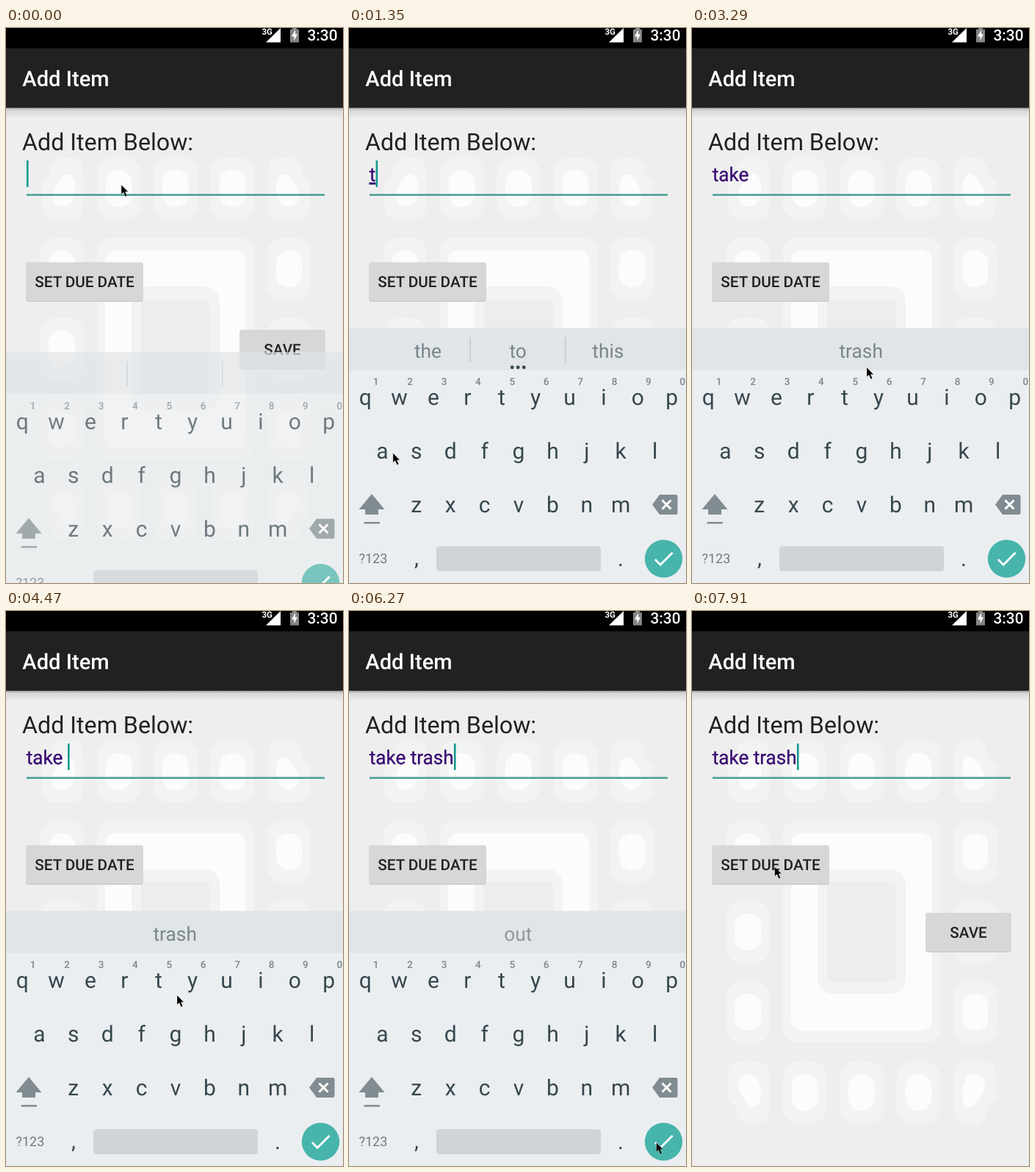
An HTML page that plays this animation: 459 px wide and 754 px high, repeating every 8000 ms.

```html
<!DOCTYPE html>
<html lang="en">
<head>
<meta charset="utf-8">
<title>Add Item</title>
<style>
  html, body { margin: 0; width: 100%; height: 100%; overflow: hidden; background: #eee; }
  svg { display: block; width: 459px; height: 754px; }
  text { font-family: Roboto, "Noto Sans", sans-serif; text-rendering: geometricPrecision; white-space: pre; }
  .mid { text-anchor: middle; }
  .medium { font-weight: 500; }
  .key { font-size: 30px; fill: #37474f; }
  .hint { font-size: 13.5px; font-weight: 500; fill: #7b868b; }
  .word { font-size: 26.3px; fill: #78868c; }
  .cap { font-size: 20.7px; fill: #202020; }
  #field { font-size: 26.1px; fill: #380a70; stroke: #380a70; stroke-width: .3px; }
</style>
</head>
<body>
<svg id="stage" viewBox="0 0 459 754" xmlns="http://www.w3.org/2000/svg">
  <defs>
    <linearGradient id="shade" x1="0" y1="0" x2="0" y2="1">
      <stop offset="0" stop-color="#000" stop-opacity=".28"/>
      <stop offset=".3" stop-color="#000" stop-opacity=".09"/>
      <stop offset="1" stop-color="#000" stop-opacity="0"/>
    </linearGradient>
  </defs>
  <rect width="459" height="754" fill="#eee"/>
  <g id="pattern"></g>

  <rect y="108" width="459" height="15" fill="url(#shade)"/>
  <rect y="27" width="459" height="81.5" fill="#212121"/>
  <rect width="459" height="27.5" fill="#000"/>
  <text x="348.5" y="8.5" font-size="11.5" font-weight="700" fill="#fff">3G</text>
  <path d="M354 19.5H374V0Z" fill="#fff"/>
  <path d="M387 2H390V0H396V2H399V19.5H387Z" fill="#858585"/>
  <path d="M394 2.5L389 11.5H392.5V17L397 8.5H394Z" fill="#fff"/>
  <text x="410.5" y="17" class="medium" font-size="20.8" fill="#fff">3:30</text>
  <text x="22.3" y="78.5" class="medium" font-size="29.1" fill="#fff">Add Item</text>

  <text x="22" y="165.5" font-size="32.2" fill="#212121">Add Item Below:</text>
  <rect x="28" y="225.5" width="406" height="2.5" fill="#469f96"/>
  <text id="field" x="27.7" y="208"></text>
  <rect id="caret" y="180" width="2.6" height="36" fill="#109a8d"/>
  <g id="buttons"></g>
  <g id="keyboard"></g>
  <path id="pointer" d="M0 0V13L3 10.3L5.4 16L7.8 15L5.4 9.6H9.4Z" fill="#000" stroke="#fff" stroke-width=".5" stroke-opacity=".7"/>
</svg>
<script>
const LOOP = 8000, STEP = 148.9, BLINK = 500, HIDE = 6800;
const PITCH = 46.4, ROW = 73.2;
const $ = id => document.getElementById(id);
const box = (x, y, w, h, r, fill) =>
  `<rect x="${x}" y="${y}" width="${w}" height="${h}" rx="${r}" fill="${fill}"/>`;
const label = (x, y, cls, s) => `<text x="${x}" y="${y}" class="mid ${cls}">${s}</text>`;
const show = (el, on) => el.setAttribute('visibility', on ? 'visible' : 'hidden');
const move = (el, x, y) => el.setAttribute('transform', `translate(${x} ${y})`);

// Each key row starts half a key further in; the last makes room for shift
const rows = ['qwertyuiop', 'asdfghjkl', 'zxcvbnm'];
const keyAt = c => {
  const j = rows.findIndex(r => r.includes(c));
  return [22.2 + PITCH * (rows[j].indexOf(c) + [0, 0.5, 1.5][j]), 512 + ROW * j];
};
const slotX = i => 107.5 + 122.7 * i;

function drawPattern() {
  const pale = '#f2f3f3', white = '#fcfcfc';
  const ring = 'M-28 12V-8Q-25 -14 -17 -18Q-18 -35 -4 -42H10Q29 -42 29 -22V22Q29 42 10 42H-9Q-28 42 -28 22Z';
  const core = 'M-13 9Q-12 -4 2 -18Q14 -24 17 -8Q20 8 12 20Q2 28 -8 22Q-14 16 -13 9Z';
  let out = '';
  for (let j = -2; j <= 2; j++) for (let i = -2; i <= 2; i++) {
    const edgeX = Math.abs(i) === 2, edgeY = Math.abs(j) === 2;
    if (!edgeX && !edgeY) continue;
    const flip = edgeX && edgeY ? `scale(${-i / 2} ${-j / 2})` : '';
    const shape = flip
      ? `<path d="${ring}" fill="${pale}"/><path d="${core}" fill="${white}"/>`
      : box(-29.5, -42, 59, 84, 20, pale) + box(-18, -25, 36, 50, 17, white);
    out += `<g transform="translate(${231 + 77.4 * i} ${436 + 109 * j}) ${flip}">${shape}</g>`;
  }
  out += box(124, 285, 214, 301, 18, pale) + box(135, 301.5, 192, 269, 15, white) +
    box(171, 351, 120, 169, 20, pale) + box(184, 369, 94, 134, 7, '#ededed');
  $('pattern').innerHTML = out;
}

function drawButtons() {
  const button = (x, y, w, s) =>
    box(x, y + 0.7, w, 53, 3, '#c8c9c9') + box(x, y, w, 52.5, 3, '#d6d7d7') +
    label(x + w / 2, y + 33.8, 'cap medium', s);
  $('buttons').innerHTML = button(27.3, 318.3, 159.4, 'SET DUE DATE') + button(318, 410, 117, 'SAVE');
}

function drawKeyboard() {
  const keys = [...rows.join('')].map(c => label(...keyAt(c), 'key', c)).join('');
  const hints = [...'1234567890'].map((c, i) => label(36.7 + PITCH * i, 485, 'hint', c)).join('');
  const slots = [0, 1, 2].map(i => label(slotX(i), 447.5, 'word', '')).join('');
  const dots = [-1, 0, 1].map(i => `<circle cx="${slotX(1) + 8 * i}" cy="461" r="2.4"/>`).join('');
  $('keyboard').innerHTML =
    box(0, 464, 459, 330, 0, '#ebeef0') + box(0, 407.5, 459, 57, 0, '#e1e5e8') +
    `<path id="splits" d="M165 420V454M294.7 420V454" stroke="#c3c9cc" stroke-width="1.6"/>` +
    slots + `<g id="dots" fill="#37474f">${dots}</g>` + hints + keys +
    `<path d="M31 633L48.5 654H40V661H22V654H13.5ZM20.5 671H42V673.5H20.5Z" fill="#808c91"/>
     <path d="M423 634H445Q447.5 634 447.5 636.5V658.5Q447.5 661 445 661H423L413 647.5Z" fill="#808c91"/>
     <path d="M426.5 641.5L438.5 653.5M438.5 641.5L426.5 653.5" stroke="#fff" stroke-width="3"/>
     <text x="13.5" y="727" font-size="18" fill="#6f7c82">?123</text>` +
    label(92, 730, 'key', ',') + label(370, 730.5, 'key', '.') +
    box(119, 704, 224, 34, 4, '#cfd4d8') +
    `<circle cx="428.5" cy="721" r="25.7" fill="#47b5ab"/>
     <path transform="translate(428.5 721) scale(1.46)" fill="#fff"
       d="M-3 4.2L-7.2 0L-8.6 1.4L-3 7L9 -5L7.6 -6.4Z"/>
     <g id="preview">${box(-36, -73, 72, 102, 4, '#d3d8db')}${box(-36, -74, 72, 101, 4, '#f5f7f8')}
     <text class="mid key" y="-30"></text></g>`;
}

// Pointer rests: time, x, y
const rests = [
  [0, 157, 213], [740, 204, 504], [1480, 45, 585], [2080, 338, 574.5], [2500, 107, 441],
  [2950, 190, 680], [3270, 238, 461], [3870, 196, 718], [4460, 233, 522],
  [4900, 231, 442], [5600, 231, 442], [6250, 418.5, 722], [6500, 426, 738], [7880, 112.7, 347.5]
];

// Each edit: the field text, the suggestions, and the key pressed if still composing
const edits = [
  { at: 0, text: '', words: ['', '', ''] },
  { at: 885, text: 't', words: ['the', 'to', 'this'], key: 't' },
  { at: 1480, text: 'ta', words: ['take', 'at', 'to'], key: 'a' },
  { at: 2370, text: 'take', words: ['', 'trash', ''] },
  { at: 4350, text: 'take ', words: ['', 'trash', ''] },
  { at: 5885, text: 'take trash', words: ['', 'out', ''] }
];

function pointerAt(t) {
  const i = rests.findIndex(r => r[0] > t);
  if (i < 0) return rests[rests.length - 1].slice(1);
  const [t0, x0, y0] = rests[i - 1], [t1, x1, y1] = rests[i];
  const p = (t - t0) / (t1 - t0), k = p * p * (3 - 2 * p);
  return [x0 + (x1 - x0) * k, y0 + (y1 - y0) * k];
}

function render(now) {
  const t = Math.floor(now / STEP) * STEP;
  const edit = edits.filter(e => e.at <= t).pop();
  const age = t - edit.at;
  const field = $('field');

  field.textContent = edit.text;
  field.setAttribute('text-decoration', edit.key ? 'underline' : 'none');
  show($('caret'), age % (2 * BLINK) < BLINK);
  $('caret').setAttribute('x', 28 + (edit.text ? field.getComputedTextLength() : 0));

  // The keyboard is still sliding in on the first step
  const board = $('keyboard');
  board.setAttribute('display', t < HIDE ? 'inline' : 'none');
  board.setAttribute('opacity', t ? 1 : 0.7);
  move(board, 0, t ? 0 : 32.7);
  show($('splits'), !edit.text || edit.key);
  show($('dots'), edit.key);
  slots.forEach((el, i) => {
    el.textContent = edit.words[i];
    el.style.opacity = edit.text === 'take trash' ? 0.8 : 1;
  });

  const pressed = edit.key && age < STEP;
  show($('preview'), pressed);
  if (pressed) {
    $('preview').querySelector('text').textContent = edit.key;
    move($('preview'), ...keyAt(edit.key));
  }
  move($('pointer'), ...pointerAt(t));
}

drawPattern();
drawButtons();
drawKeyboard();
const slots = [...document.querySelectorAll('.word')];

function tick() {
  render(performance.now() % LOOP);
  requestAnimationFrame(tick);
}
tick();
</script>
</body>
</html>
```
